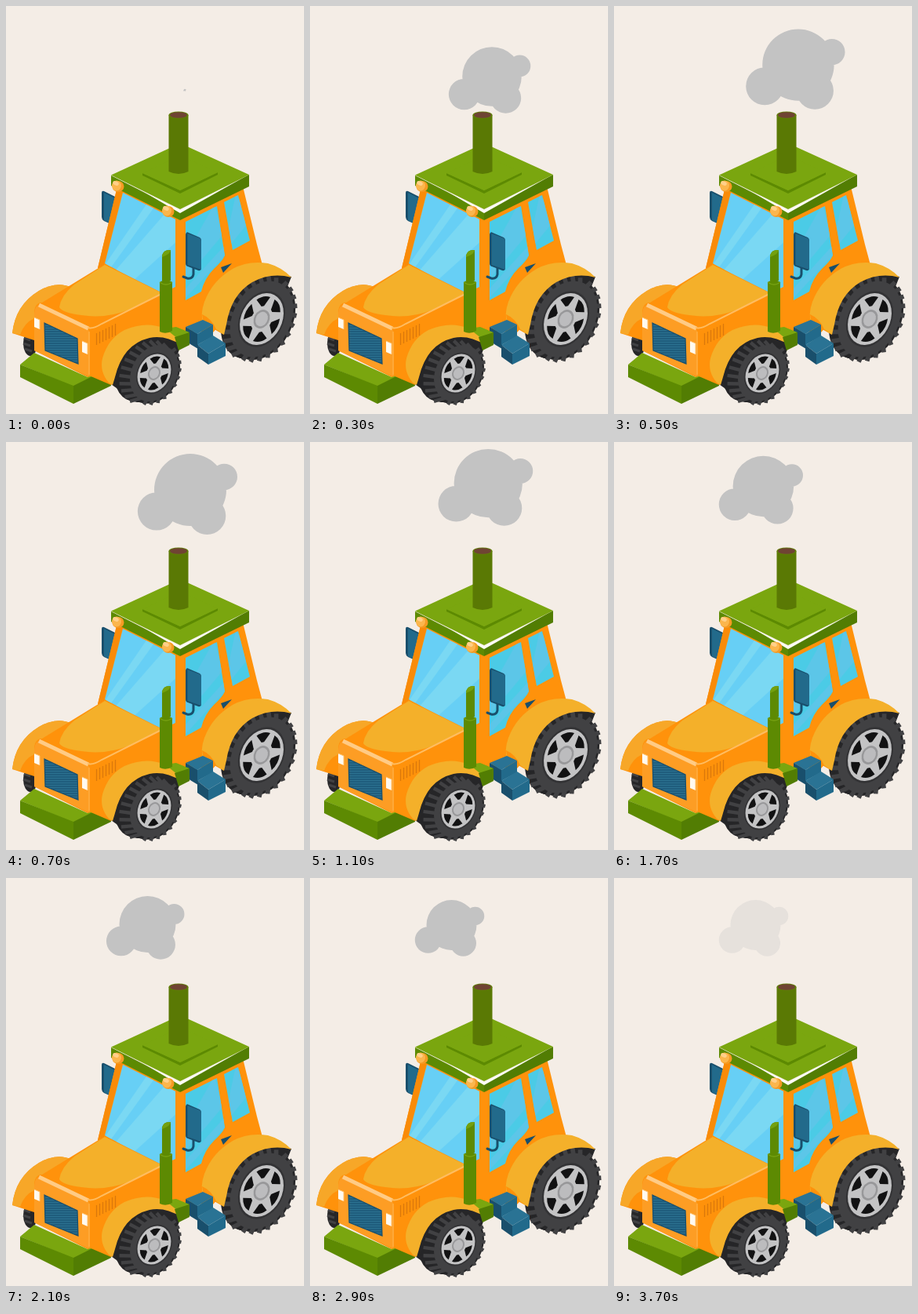
Write an HTML page with a canvas that moves like this. It is 380x520 px and loops after 4 s.

```html
<!DOCTYPE html>
<html lang="en">
<head>
<meta charset="utf-8">
<title>Tractor</title>
<style>
html, body { margin: 0; width: 100%; height: 100%; overflow: hidden; background: #f4ede6; }
canvas { display: block; }
</style>
</head>
<body>
<canvas id="stage" width="380" height="520"></canvas>
<script>
const W = 380, H = 520, LOOP = 4000, TAU = Math.PI * 2;
const C = {
  bg: '#f4ede6', smoke: '#c3c3c3',
  orange: '#ff920b', deep: '#f98b08', yellow: '#f4b02a', amber: '#f7a728', cream: '#ffcb85',
  leaf: '#7aa60f', green: '#5d8a02', moss: '#527d03', pipe: '#5a7904',
  glass: '#67cff5', shine: '#7ad8f3', aqua: '#4bcbe6', sheen: '#5cc6e8',
  blue: '#226a8b', navy: '#194f6c', sky: '#2a7394',
  tyre: '#414143', tread: '#262628', rim: '#c3c3c4', steel: '#98989a', hole: '#121213'
};
const stage = document.getElementById('stage').getContext('2d');
const scene = document.createElement('canvas');
scene.width = W;
scene.height = H;
const g = scene.getContext('2d');

function fill(color, d) {
  g.fillStyle = color;
  g.fill(new Path2D(d));
}

function line(color, width, d) {
  g.strokeStyle = color;
  g.lineWidth = width;
  g.stroke(new Path2D(d));
}

function oval(color, x, y, rx, ry, rot = 0) {
  g.fillStyle = color;
  g.beginPath();
  g.ellipse(x, y, rx, ry, rot, 0, TAU);
  g.fill();
}

function clipped(d, draw) {
  g.save();
  g.clip(new Path2D(d));
  draw();
  g.restore();
}

// Tilted tyre: swept tread, lugs around the face, spoked rim.
function wheel(x, y, rx, ry, depth, lugs) {
  const tilt = 0.48;
  for (let i = depth; i >= 0; i--) oval(C.tread, x - i, y - i * 0.15, rx * 0.96, ry * 0.96, tilt);
  g.save();
  g.translate(x, y);
  g.rotate(tilt);
  const spot = (a, r) => [Math.cos(a) * rx * r, Math.sin(a) * ry * r];

  g.strokeStyle = C.tyre;
  g.lineWidth = rx * 0.14;
  for (let i = 0; i < lugs; i++) {
    const a = i / lugs * TAU, back = Math.cos(a) < 0.1 ? depth * 0.55 : 0;
    const [ex, ey] = spot(a + 0.05, 1.01);
    g.beginPath();
    g.moveTo(...spot(a, 0.85));
    g.lineTo(ex - back, ey + back * 0.4);
    g.stroke();
  }
  oval(C.tyre, 0, 0, rx * 0.9, ry * 0.9);
  oval('#333335', 0, 0, rx * 0.68, ry * 0.66);
  oval(C.rim, 0, 0, rx * 0.63, ry * 0.61);

  g.fillStyle = C.hole;
  for (let i = 0; i < 6; i++) {
    const a = i / 6 * TAU;
    g.beginPath();
    g.moveTo(...spot(a - 0.12, 0.31));
    g.lineTo(...spot(a - 0.38, 0.53));
    g.quadraticCurveTo(...spot(a, 0.59), ...spot(a + 0.38, 0.53));
    g.lineTo(...spot(a + 0.12, 0.31));
    g.fill();
  }
  oval(C.steel, 0, 0, rx * 0.24, ry * 0.22);
  oval('#bcbcbe', 0, 0, rx * 0.18, ry * 0.17);
  g.restore();
}

function lamp(x, y) {
  oval('#f59a23', x + 1, y + 1, 7.5, 7);
  oval('#fbb64d', x - 1, y, 6, 6.5);
  oval('#ffd08a', x - 2, y - 3, 4, 2.5, 0.4);
}

function cab() {
  fill(C.navy, 'M122 238Q122 235 125 236L139 243Q141 244 141 247V281L125 274Q122 272 122 269Z');
  fill(C.blue, 'M125 238L141 246V281L125 273Z');
  fill(C.orange, 'M142 230L222 269L302 230L320 304L331 345L264 416L197 413L117 334Z');
  fill(C.deep, 'M142 230L149 235L124 334L117 334Z');

  const front = 'M149 238L216 272V358L197 367L126 328Z';
  fill(C.glass, front);
  clipped(front, () => {
    fill(C.shine, 'M205 262L220 272V298L160 352L137 340Z');
    fill(C.shine, 'M181 250L190 255L134 333L126 330Z');
  });

  const door = 'M229 275L269 255L279 318Q276 325 265 335Q253 347 249 364L229 375Z';
  fill(C.aqua, door);
  clipped(door, () => {
    fill(C.sheen, 'M266 252L276 292L229 348V318Z');
    fill(C.sheen, 'M278 306L279 318L229 372V360Z');
  });

  const rear = 'M278 250L296 241L311 299L289 311Z';
  fill(C.aqua, rear);
  clipped(rear, () => fill(C.sheen, 'M293 240L300 250L306 280L287 303L284 282Z'));
  fill(C.navy, 'M274 333L288 328L277 340Z');
}

function roof() {
  fill(C.green, 'M134 216L222 261V273L134 229Z');
  fill(C.moss, 'M310 215L222 261V273L310 230Z');
  fill('#fdfcf5', 'M176 237L222 260L302 219L222 264Z');
  fill(C.leaf, 'M134 215.5L222 175L310 215L222 259Z');
  fill(C.green, 'M174 213L222 235L270 212V215L222 239L174 216Z');
  fill(C.leaf, 'M174 213L222 190L270 212L222 235Z');
  fill(C.pipe, 'M207.5 139H232.5V211Q220 217 207.5 211Z');
  oval('#617f08', 220, 139, 12.5, 4.5);
  oval('#6f4433', 220, 139, 11, 3.8);
  lamp(142, 229);
  lamp(206, 261);
}

function back() {
  fill(C.tread, 'M277 418Q278 370 304 350Q326 336 364 345L350 380L300 440Z');
  wheel(326, 399, 41, 57, 9, 26);
  fill(C.yellow, 'M252 404Q247 394 253 377Q263 350 289 335Q309 324 334 328Q352 333 364 346Q338 339 314 352Q287 368 281 406L278 419Z');
  fill(C.orange, 'M252 404L250 393Q262 398 268 412L278 419Z');

  fill(C.navy, 'M229 409L245 418V437L235 431L229 426Z');
  fill(C.sky, 'M229 409L251 400L264 406L244 418Z');
  fill(C.blue, 'M244 418L264 406V421L244 432Z');
  fill(C.sky, 'M244 432L264 420L280 430L258 443Z');
  fill(C.navy, 'M244 432L258 443V457L244 447Z');
  fill(C.blue, 'M258 443L280 430V446L258 457Z');
}

function hood() {
  oval(C.tread, 31, 430, 9, 16);
  line(C.tyre, 3, 'M23 423L31 426M22 430L31 433M24 437L33 440');
  fill(C.orange, 'M8 417Q12 381 42 363Q65 350 84 359L62 390L36 426Z');
  fill(C.amber, 'M8 417Q12 381 42 363Q65 350 84 359L60 375L40 381Q36 384 36 398Q23 404 18 419Z');

  fill(C.orange, 'M36 390Q37 378 46 378L126 329L200 366V418L152 432L118 473L104 473L36 439Z');
  fill(C.yellow, 'M126 330L199 366L157 387Q127 399 96 394Q72 391 68 384Q70 369 87 355Z');
  fill('#fd9d24', 'M36 392Q37 380 46 380L103 410Q107 413 107 420V473L36 439Z');
  line(C.cream, 5, 'M42 381L105 411');
  line('#ffbd61', 2, 'M104 410Q111 412 122 405L198 367');
  line('#ffb44e', 1, 'M106 415V470');
  for (let i = 0; i < 7; i++) {
    const x = 115.5 + i * 4, y = 417 - i * 2;
    line('#d9780c', 1.3, `M${x} ${y}V${y + 15}`);
  }

  const grille = 'M49 404L91 424L92 456L50 439Z';
  fill('#1f5d7d', grille);
  clipped(grille, () => {
    for (let y = 404.5; y < 458; y += 3) line('#2b7190', 1, `M48 ${y}H94`);
  });
  line('#194f6c', 1.2, grille);
  fill('#fffaf0', 'M36 397L43 400V412L36 409Z');
  fill('#fffaf0', 'M97 427L104 430V444L97 441Z');
  line('#ffc472', 1, 'M36 397L43 400V412M97 427L104 430V444');
}

function nose() {
  fill(C.leaf, 'M18 457L36 442L104 473L134 464L86 485Z');
  fill(C.green, 'M18 457L86 484V507L18 473Z');
  fill(C.moss, 'M86 484L112 471L134 480V484L86 507Z');
  fill(C.tread, 'M134 482Q140 436 176 422Q203 415 223 432L215 455L152 495Z');
  wheel(189, 468, 32, 42, 17, 24);
  fill(C.orange, 'M106 471L118 462Q124 436 151 414L182 409L170 426Q148 438 138 473L134 483Z');
  fill(C.yellow, 'M131 480Q119 466 123 449Q130 424 151 413Q178 401 203 411Q216 417 223 432Q203 419 183 423Q149 431 139 473L136 483Z');
}

function fittings() {
  fill(C.leaf, 'M203 411L217 409L234 416L219 424Z');
  fill(C.moss, 'M234 416V432L220 439L215 422Z');
  fill(C.green, 'M196 352Q204 346 212 352V414Q204 419 196 415Z');
  fill(C.green, 'M199 318Q201 310 210 311V350H199Z');
  fill('#73a00f', 'M199 318Q201 310 210 311Q210 316 199 320Z');
  line('#76a112', 1.5, 'M196 352Q204 358 212 352');

  g.lineCap = 'round';
  line(C.navy, 3, 'M239 333V342Q238 348 231 347L226 345');
  g.lineCap = 'butt';
  fill(C.navy, 'M229 291Q230 287 233 289L247 295Q249 296 249 299V335Q248 338 245 337L232 332Q229 331 229 328Z');
  fill(C.blue, 'M231.5 290L247 296Q249 297 249 300V336L231.5 330Z');
}

g.fillStyle = C.bg;
g.fillRect(0, 0, W, H);
[cab, roof, back, hood, nose, fittings].forEach(draw => draw());

// Smoke puff keys: time, x, y, radius.
const KEYS = [
  [0, 228, 107, 1.3], [300, 232, 90, 38], [600, 236, 67.5, 46.3],
  [700, 235, 61, 46], [1200, 224, 51.5, 43], [1500, 204.5, 53, 40.5],
  [1800, 185, 58, 38], [2100, 180.5, 59, 36], [2400, 180.5, 60, 34.5],
  [2900, 180.5, 60, 32], [4000, 180.5, 60, 32]
];
// Lobes relative to the main circle: x, y, radius.
const LOBES = [[0, 0, 1], [0.94, -0.36, 0.365], [-0.935, 0.595, 0.525], [0.465, 0.72, 0.52]];

function slope(i, k) {
  const a = KEYS[Math.max(i - 1, 0)], b = KEYS[Math.min(i + 1, KEYS.length - 1)];
  return (b[k] - a[k]) / (b[0] - a[0]);
}

function at(t, k) {
  if (t >= 2900) return KEYS[KEYS.length - 1][k];
  if (k === 3 && t < 600) return 1.3 + 45 * (1 - Math.pow(1 - t / 600, 2.4));
  let i = 0;
  while (KEYS[i + 1][0] <= t) i++;
  const a = KEYS[i], b = KEYS[i + 1], d = b[0] - a[0], u = (t - a[0]) / d, v = 1 - u;
  return v * v * (1 + 2 * u) * a[k] + u * u * (3 - 2 * u) * b[k]
    + d * u * v * (v * slope(i, k) - u * slope(i + 1, k));
}

function puff(t) {
  const x = at(t, 1), y = at(t, 2), r = at(t, 3);
  stage.globalAlpha = t < 3200 ? 1 : t < 3700 ? 0.65 : 0.3;
  stage.fillStyle = C.smoke;
  stage.beginPath();
  for (const [dx, dy, s] of LOBES) {
    stage.moveTo(x + (dx + s) * r, y + dy * r);
    stage.arc(x + dx * r, y + dy * r, s * r, 0, TAU);
  }
  stage.fill();
  stage.globalAlpha = 1;
}

function frame() {
  const t = Math.floor(performance.now() % LOOP / 100) * 100;
  stage.drawImage(scene, 0, 0);
  puff(t);
  requestAnimationFrame(frame);
}
frame();
</script>
</body>
</html>
```
